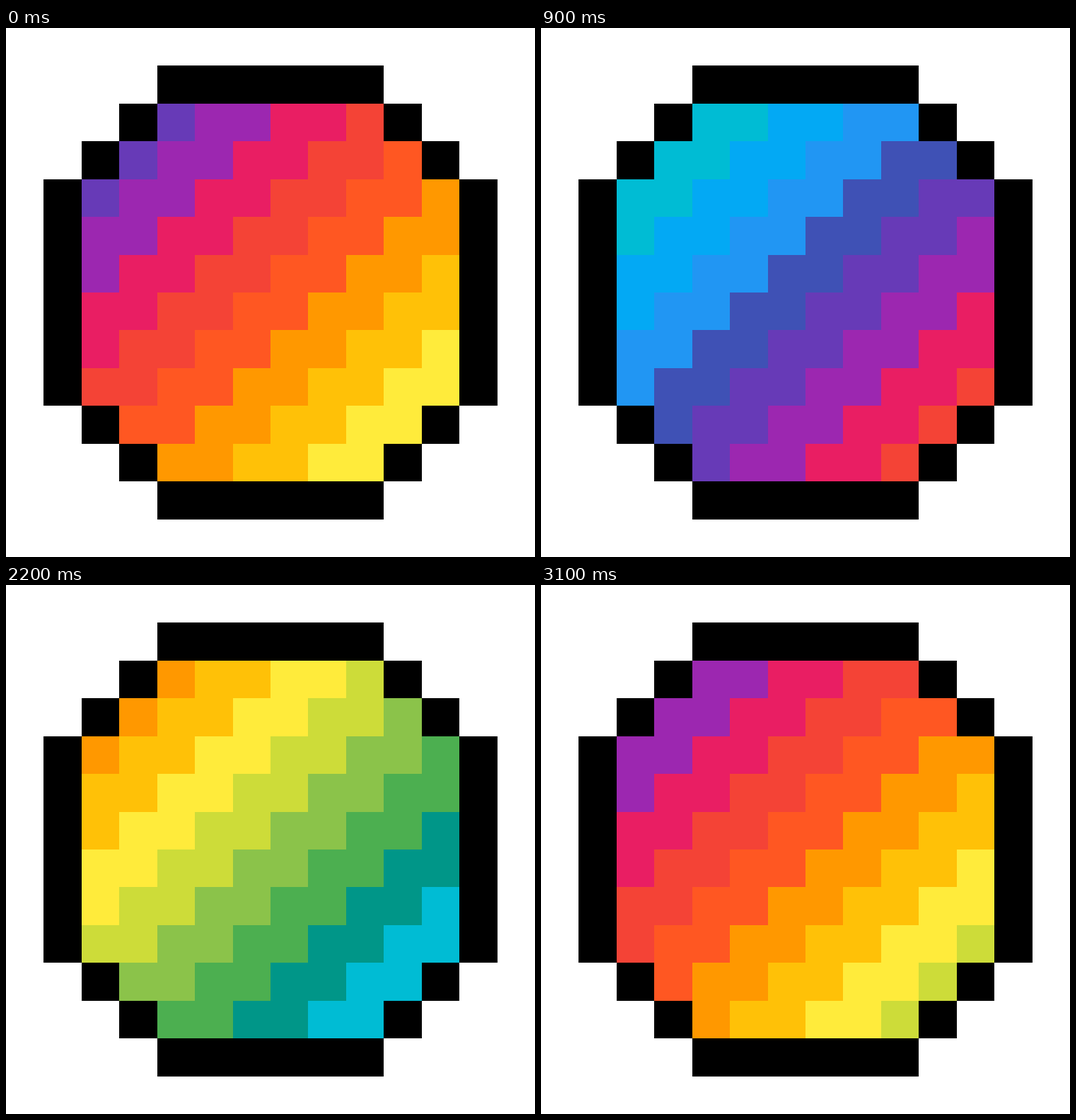
An HTML page that plays this animation: 748x748 px, repeating every 3.2 s.

```html
<!DOCTYPE html>
<html lang="en">
<head>
<meta charset="utf-8">
<title>Rainbow disc</title>
<style>
  html, body { margin: 0; width: 100%; height: 100%; overflow: hidden; background: #fff; }
  svg { display: block; width: 100%; height: 100%; }
</style>
</head>
<body>
<svg viewBox="0 0 748 748" shape-rendering="crispEdges"></svg>
<script>
const STAGE = 748, CELLS = 14, STEP = 100, LOOP = 3200;
const PALETTE = [
  '#673ab7', '#9c27b0', '#e91e63', '#f44336', '#ff5722', '#ff9800', '#ffc107', '#ffeb3b',
  '#cddc39', '#8bc34a', '#4caf50', '#009688', '#00bcd4', '#03a9f4', '#2196f3', '#3f51b5'
];
const svg = document.querySelector('svg');

const edge = n => Math.round(n * STAGE / CELLS);
const cell = (col, row) =>
  `M${edge(col)} ${edge(row)}H${edge(col + 1)}V${edge(row + 1)}H${edge(col)}Z`;

function addPath(d, fill) {
  const path = document.createElementNS('http://www.w3.org/2000/svg', 'path');
  path.setAttribute('d', d);
  path.setAttribute('fill', fill);
  return svg.appendChild(path);
}

// Sort the disc's cells into the black rim and the diagonals of the fill.
let rim = '';
const diagonals = {};
for (let row = 1; row < CELLS - 1; row++) {
  const last = CELLS - 1;
  const inset = Math.max(1, 5 - Math.min(row, last - row));
  for (let col = inset; col <= last - inset; col++) {
    const onRim = row === 1 || row === last - 1 || col === inset || col === last - inset;
    if (onRim) rim += cell(col, row);
    else diagonals[col + row] = (diagonals[col + row] || '') + cell(col, row);
  }
}
addPath(rim, '#000');

// Every diagonal runs backwards through the palette, one step behind its neighbour.
const cycle = [PALETTE[0], ...PALETTE.slice().reverse()]
  .map(fill => ({ fill, easing: 'step-end' }));
for (const [sum, d] of Object.entries(diagonals)) {
  addPath(d, PALETTE[0]).animate(cycle, {
    duration: LOOP,
    delay: (sum - 6) * STEP - LOOP,
    iterations: Infinity
  });
}
</script>
</body>
</html>
```
